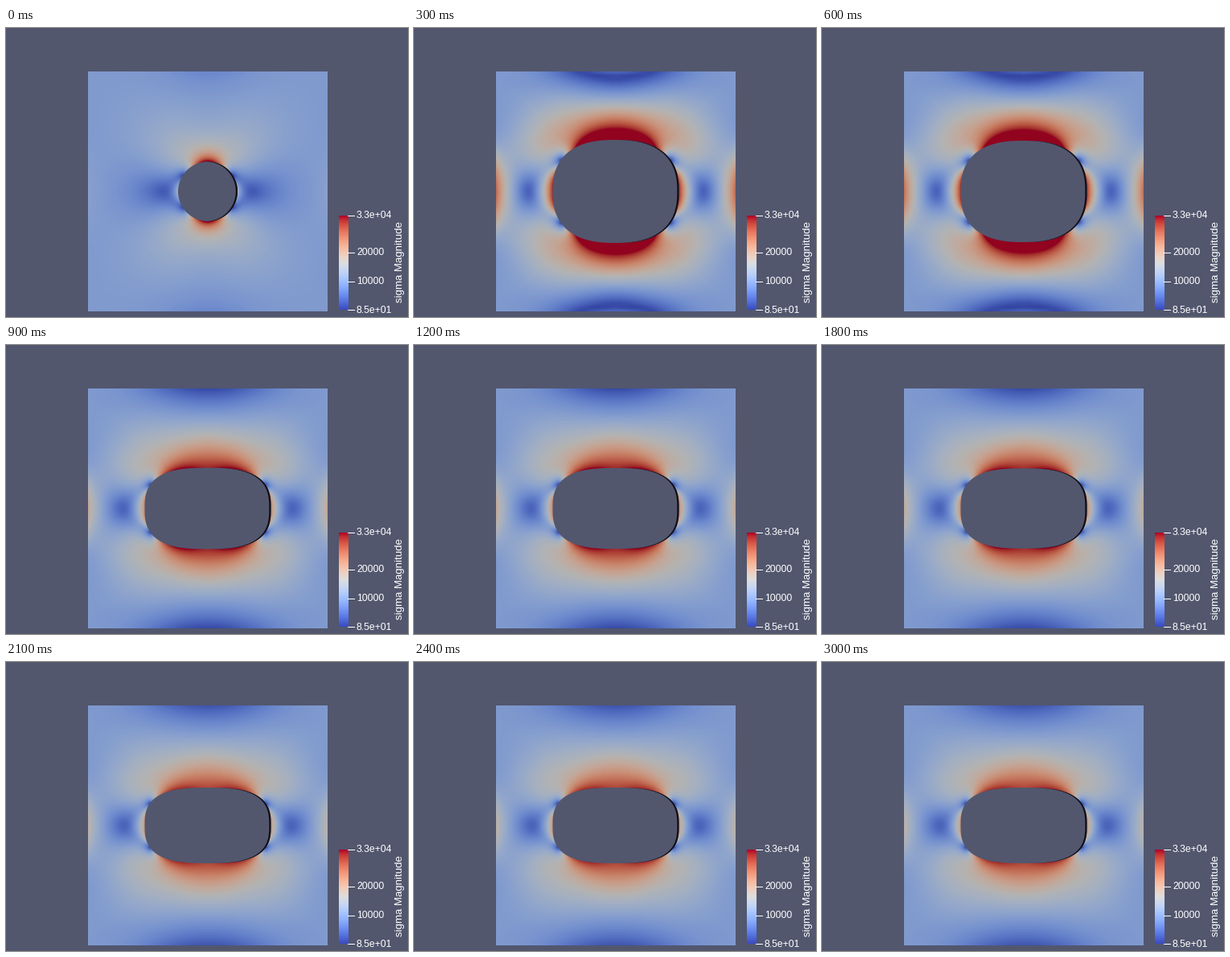
Animation, 500 px wide and 359 px high, one loop 3300 ms. Source, as a matplotlib script:

```python
import numpy as np
import matplotlib.pyplot as plt
from matplotlib.animation import FuncAnimation
from matplotlib.colors import ListedColormap

W, H, DPI = 500, 359, 128
CX, CY, HALF = 251, 203, 149        # plate centre and half side, in pixels
LOAD = 1e4                          # horizontal tension on the plate
VMIN, VMAX = 85, 33000
BACK = (0.32, 0.34, 0.43)
WALL = (0.07, 0.05, 0.08)
NR, NT, GRADE = 24, 48, 1.5         # mesh: radial cells, angular cells, grading

# Hole in each step: half width, half height, superellipse exponent
CIRCLE = (37, 37, 2.0)
SHAPES = [CIRCLE, (78.5, 64, 2.5), (78.5, 63, 2.52), (78.5, 50.5, 2.8),
          (78.5, 50.2, 2.8), (78.5, 50, 2.8), (78.5, 49.8, 2.8)]
SHAPES += [(78.5, 47, 2.85)] * 4


def hole_radius(th, shape):
    a, b, n = shape
    c, s = np.abs(np.cos(th)), np.abs(np.sin(th))
    return ((c / a) ** n + (s / b) ** n) ** (-1 / n)


def plate_radius(th):
    return HALF / np.maximum(np.abs(np.cos(th)), np.abs(np.sin(th)))


# Corners of the unit element, also the signs of its Gauss points
SIGN = np.array([[-1, -1], [1, -1], [1, 1], [-1, 1]])


def shape_values(p):
    return 0.25 * (1 + SIGN[:, 0] * p[0]) * (1 + SIGN[:, 1] * p[1])


def shape_slopes(p):
    x, y = SIGN.T
    return 0.25 * np.array([x * (1 + y * p[1]), y * (1 + x * p[0])])


def stress_magnitude(shape):
    """Plane-stress finite elements on a quarter plate; nodes are [angle, radius]."""
    th = np.linspace(0, np.pi / 2, NT + 1)[:, None]
    s = np.linspace(0, 1, NR + 1)[None, :] ** GRADE
    inner, outer = hole_radius(th, shape), plate_radius(th)
    r = inner + s * (outer - inner)
    xy = np.stack([r * np.cos(th), r * np.sin(th)], -1).reshape(-1, 2)

    ids = np.arange(len(xy)).reshape(NT + 1, NR + 1)
    cells = np.stack([ids[:-1, :-1], ids[:-1, 1:], ids[1:, 1:], ids[1:, :-1]],
                     -1).reshape(-1, 4)
    dofs = np.stack([2 * cells, 2 * cells + 1], -1).reshape(-1, 8)
    nu = 0.3
    law = np.array([[1, nu, 0], [nu, 1, 0], [0, 0, (1 - nu) / 2]]) / (1 - nu**2)

    local = np.zeros((len(cells), 8, 8))
    strain_ops = []
    for p in SIGN / np.sqrt(3):
        slopes = shape_slopes(p)
        jac = slopes @ xy[cells]
        grad = np.linalg.solve(jac, np.broadcast_to(slopes, (len(cells), 2, 4)))
        op = np.zeros((len(cells), 3, 8))
        op[:, 0, 0::2] = op[:, 2, 1::2] = grad[:, 0]
        op[:, 1, 1::2] = op[:, 2, 0::2] = grad[:, 1]
        area = np.linalg.det(jac)[:, None, None]
        local += op.transpose(0, 2, 1) @ law @ op * area
        strain_ops.append(op)

    size = 2 * len(xy)
    stiff = np.zeros((size, size))
    np.add.at(stiff, (dofs[:, :, None], dofs[:, None, :]), local)

    force = np.zeros(size)
    edge = ids[:NT // 2 + 1, -1]
    pull = LOAD * np.diff(xy[edge, 1]) / 2
    np.add.at(force, 2 * edge[:-1], pull)
    np.add.at(force, 2 * edge[1:], pull)

    fixed = np.concatenate([2 * ids[0] + 1, 2 * ids[-1]])
    free = np.setdiff1d(np.arange(size), fixed)
    move = np.zeros(size)
    move[free] = np.linalg.solve(stiff[np.ix_(free, free)], force[free])

    # Gauss-point stresses carried out to the corners, then averaged per node
    gauss = np.stack([(op @ move[dofs][:, :, None])[..., 0] @ law
                      for op in strain_ops], 1)
    extend = np.array([shape_values(np.sqrt(3) * c) for c in SIGN])
    corner = extend @ gauss
    total = np.zeros((len(xy), 3))
    np.add.at(total, cells, corner)
    sx, sy, sxy = (total / np.bincount(cells.ravel())[:, None]).T
    return np.sqrt(sx**2 + sy**2 + 2 * sxy**2).reshape(NT + 1, NR + 1)


def plate_field(shape):
    """Interpolate the nodal stress at every pixel of the plate."""
    nodal = stress_magnitude(shape)
    axis = np.abs(np.arange(2 * HALF) + 0.5 - HALF)
    x, y = np.meshgrid(axis, axis)
    th, r = np.arctan2(y, x), np.hypot(x, y)
    inner = hole_radius(th, shape)
    s = np.clip((r - inner) / (plate_radius(th) - inner), 0, 1)
    u = s ** (1 / GRADE) * NR
    v = th / (np.pi / 2) * NT
    i = np.minimum(u.astype(int), NR - 1)
    j = np.minimum(v.astype(int), NT - 1)
    u, v = u - i, v - j
    low = nodal[j, i] * (1 - u) + nodal[j, i + 1] * u
    high = nodal[j + 1, i] * (1 - u) + nodal[j + 1, i + 1] * u
    return low * (1 - v) + high * v


def outline(shape, start, stop):
    th = np.linspace(start, stop, 241)
    r = hole_radius(th, shape)
    return np.column_stack([CX + r * np.cos(th), CY + r * np.sin(th)])


def wall_outline(shape):
    rim = outline(shape, -np.pi / 2, np.pi / 2)
    return np.vstack([rim, rim[::-1] - (2.2, 0)])


fields = {shape: plate_field(shape) for shape in dict.fromkeys(SHAPES)}

fig = plt.figure(figsize=(W / DPI, H / DPI), dpi=DPI, facecolor=BACK)
ax = fig.add_axes([0, 0, 1, 1])
ax.axis("off")

warm = plt.get_cmap("coolwarm")
lit = ListedColormap(warm(np.arange(256))[:, :3] * 0.81)
plate = ax.imshow(fields[CIRCLE], cmap=lit, vmin=VMIN, vmax=VMAX,
                  extent=(CX - HALF, CX + HALF, CY + HALF, CY - HALF),
                  aspect="auto", interpolation="nearest")
hole, = ax.fill([0], [0], color=BACK, lw=0, zorder=2)
wall, = ax.fill([0], [0], color=WALL, lw=0, zorder=3)

# Colour bar
TOP, BOTTOM = 233, 350
ax.imshow(np.linspace(1, 0, BOTTOM - TOP)[:, None], cmap=warm, aspect="auto",
          extent=(414, 426, BOTTOM, TOP), interpolation="nearest")
style = dict(color="white", family="Liberation Sans")
for value, label in [(VMAX, "3.3e+04"), (20000, "20000"),
                     (10000, "10000"), (VMIN, "8.5e+01")]:
    y = BOTTOM - (value - VMIN) / (VMAX - VMIN) * (BOTTOM - TOP)
    y = np.floor(y - 0.5) + 0.5
    ax.plot([425, 433], [y, y], color="white", lw=72 / DPI)
    ax.text(436, y - 0.5, label, fontsize=12.1 * 72 / DPI,
            va="center_baseline", **style)
ax.text(490, 290.5, "sigma Magnitude", rotation=90, ha="center", va="center",
        fontsize=13.2 * 72 / DPI, **style)

ax.set_xlim(0, W)
ax.set_ylim(H, 0)


def draw(step):
    shape = SHAPES[step]
    plate.set_data(fields[shape])
    hole.set_xy(outline(shape, 0, 2 * np.pi))
    wall.set_xy(wall_outline(shape))
    return plate, hole, wall


anim = FuncAnimation(fig, draw, frames=len(SHAPES), interval=300,
                     repeat=True, repeat_delay=0)
plt.show()
```
